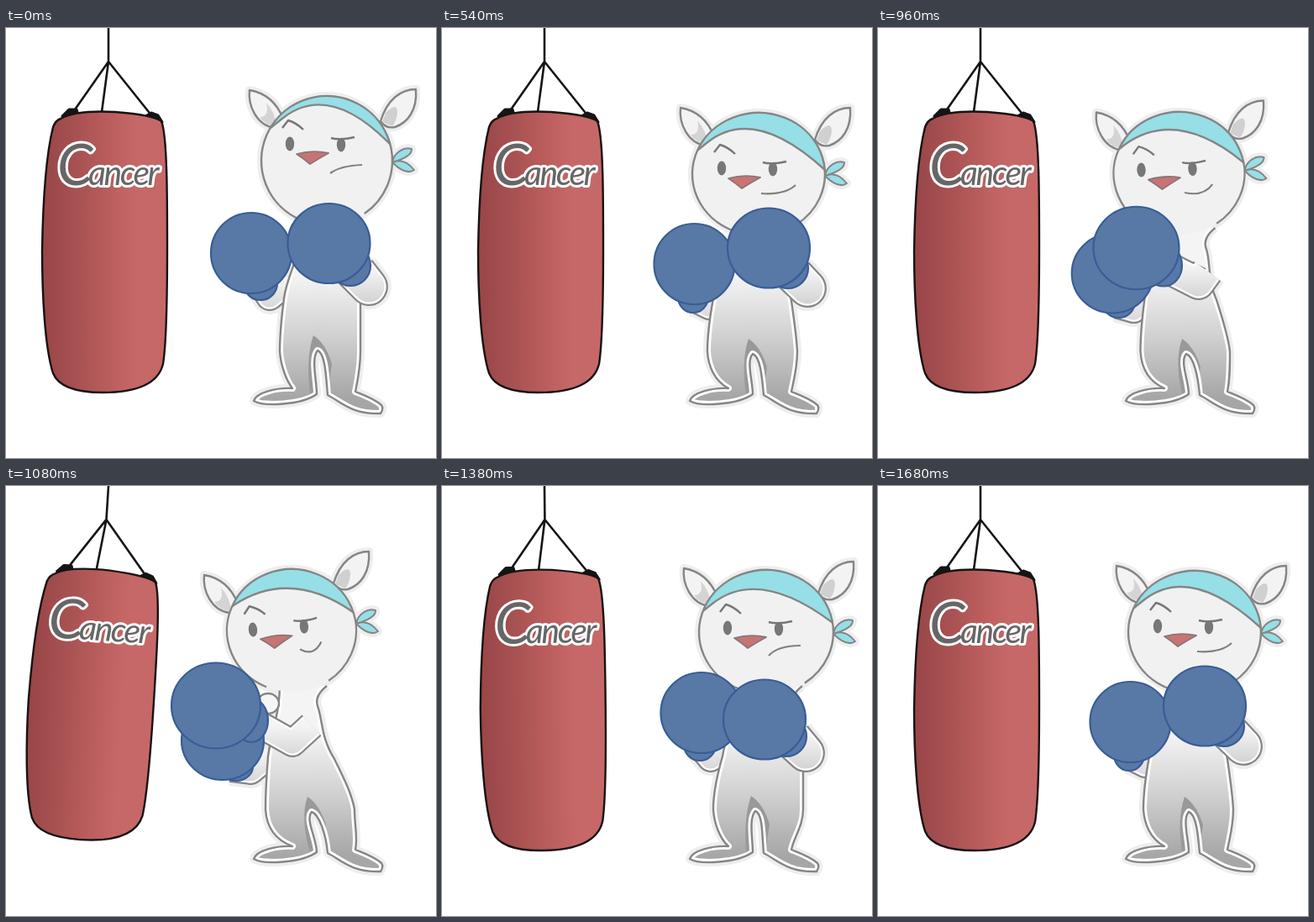
Write an HTML page with a canvas that moves like this. It is 512 px wide and 512 px high and loops after 1.74 s.

```html
<!DOCTYPE html>
<html lang="en">
<head>
<meta charset="utf-8">
<title>Punching bag</title>
<style>
html, body { margin: 0; width: 100%; height: 100%; overflow: hidden; background: #fff; }
canvas { display: block; width: 100vw; height: 100vh; }
</style>
</head>
<body>
<canvas id="stage" width="512" height="512"></canvas>
<script>
const ctx = document.getElementById('stage').getContext('2d');
const STEP = 60, FRAMES = 29;
const GRAY = '#858585', BLUE = '#5878a6', NAVY = '#395d96';

// head: cx cy rx ry; torso: neck, chest, hip (left), crotch x y, hip, chest, neck (right)
// arms: shoulder, elbow, wrist, thickness; mouth is relative to the left eye
const up = {
  head: [382, 158, 78, 77], eye: [338, 138], tilt: [0], mouth: [48, 35, 60, 26, 86, 25],
  band: [330, 107, 384, 65, 455, 136], earL: [290, 74], earR: [488, 73],
  torso: [352, 331, 326, 371, 384, 422, 422, 412],
  armL: [338, 300, 314, 320, 303, 303, 34], armR: [418, 290, 432, 308, 410, 286, 46],
  gloveL: [292, 268, 48, 48], cuffL: [303, 304, 20, 20],
  gloveR: [384.5, 256.5, 49, 47.5], cuffR: [410, 283, 24, 24], wrist: [0]
};
const sink = {
  head: [386, 174, 80, 74], eye: [340, 169], tilt: [0], mouth: [49, 33, 60, 21, 87, 21],
  band: [322, 140, 377, 97, 464, 162], earL: [288, 98], earR: [490, 90],
  torso: [356, 334, 323, 373, 387, 430, 430, 416],
  armL: [340, 308, 320, 324, 307, 308, 34], armR: [418, 300, 433, 318, 410, 297, 46],
  gloveL: [309, 270, 48.5, 48], cuffL: [307, 308, 19, 19],
  gloveR: [384, 278, 49, 47.5], cuffR: [410, 298, 24, 24], wrist: [0]
};
const low = {
  ...sink,
  head: [387, 180, 80, 73], eye: [341, 179], mouth: [50, 32, 62, 21, 87, 19],
  band: [322, 150, 378, 109, 464, 165], earL: [288, 108], earR: [491, 96],
  torso: [356, 335, 322, 375, 388, 433, 434, 416],
  armL: [340, 310, 322, 326, 308, 308, 34], armR: [418, 302, 433, 320, 410, 300, 46],
  gloveL: [313, 271, 48, 48], cuffL: [308, 309, 19, 19],
  gloveR: [383.5, 285, 49, 47.5], cuffR: [410, 302, 24, 23]
};
const lean = {
  head: [377, 174, 79, 73], eye: [333, 167], tilt: [0], mouth: [47, 30, 75, 32, 88, 20],
  band: [315, 137, 371, 91, 456, 169], earL: [284, 95], earR: [486, 95],
  torso: [350, 323, 316, 370, 388, 423, 416, 408],
  armL: [332, 318, 318, 333, 302, 325, 30], armR: [420, 294, 435, 310, 412, 288, 46],
  gloveL: [300.5, 281, 48, 48], cuffL: [299, 320, 18, 19],
  gloveR: [389, 262, 49, 47.5], cuffR: [412, 286, 24, 24], wrist: [0]
};
const guard = {
  head: [340, 172, 77, 73], eye: [294, 171], tilt: [-.08], mouth: [54, 28, 70, 38, 80, 21],
  band: [271, 142, 338, 98, 413, 150], earL: [236, 106], earR: [432, 78],
  torso: [326, 312, 309, 364, 388, 415, 391, 369],
  armL: [315, 318, 291, 338, 268, 335, 36], armR: [364, 285, 341, 306, 302, 284, 34],
  gloveL: [258, 303, 49, 47], cuffL: [274, 334, 20, 17],
  gloveR: [250, 261.5, 53, 51], cuffR: [292, 279, 20, 26], wrist: [13]
};
const hit = {
  ...guard, armR: [364, 285, 328, 298, 272, 280, 34],
  gloveR: [226, 262, 53, 51], cuffR: [268, 279, 20, 26], wrist: [0]
};

const poseKeys = [
  [0, up], [1, sink], [2, low], [4, lean], [5, up], [6, sink], [7, low], [9, lean],
  [10, up], [11, sink], [13, low], [15, lean], [17, hit], [18, guard],
  [22, up], [23, sink], [25, low], [28, lean], [29, up]
];
const swingKeys = [[0, 0], [16, 0], [17, 2], [18, 3.6], [22, 0], [23, -.6], [26, 0], [29, 0]];

const mix = (a, b, k) => a + (b - a) * k;
function sample(keys, frame, blend) {
  const i = keys.findIndex(key => key[0] > frame);
  const [t0, a] = keys[i - 1], [t1, b] = keys[i];
  return blend(a, b, (frame - t0) / (t1 - t0));
}
const mixPose = (a, b, k) => Object.fromEntries(
  Object.keys(a).map(name => [name, a[name].map((v, i) => mix(v, b[name][i], k))]));

function paint(path, fill, stroke, width = 2.4) {
  if (fill) { ctx.fillStyle = fill; ctx.fill(path); }
  if (stroke) { ctx.strokeStyle = stroke; ctx.lineWidth = width; ctx.stroke(path); }
}
function oval([x, y, rx, ry], from = 0, to = Math.PI * 2) {
  const path = new Path2D();
  path.ellipse(x, y, rx, ry, 0, from, to);
  return path;
}
function moved(d, x, y) {
  const path = new Path2D();
  path.addPath(new Path2D(d), new DOMMatrix([1, 0, 0, 1, x, y]));
  return path;
}
function gradient(x0, y0, x1, y1, ...colors) {
  const g = ctx.createLinearGradient(x0, y0, x1, y1);
  colors.forEach((c, i) => g.addColorStop(i / (colors.length - 1), c));
  return g;
}
function inside(path, draw) {
  ctx.save();
  ctx.clip(path);
  draw();
  ctx.restore();
}

function drawBag(angle) {
  const squash = 1 - Math.max(0, angle) * .01;
  ctx.save();
  ctx.translate(122, 0);
  ctx.rotate(angle * Math.PI / 180);
  ctx.translate(-122, 0);
  paint(new Path2D('M122 -8V40L80 100M122 40L114 100M122 40L174 105'), null, '#151515', 2.6);
  ctx.translate(0, 110 * (1 - squash));
  ctx.scale(1, squash);
  paint(new Path2D('M67 105L75 97 84 97 86 104ZM166 105L173 101 181 104 186 112Z'), '#151515', '#151515', 3);
  paint(new Path2D(`M65 108C80 99 110 99 130 100C155 102 178 105 185 111
    C192 128 192 200 192 260C192 330 191 375 187 400C181 425 152 434 115 434
    C82 434 62 426 56 411C46 380 43 315 43 265C44 205 48 150 56 118Q59 110 65 108Z`),
    gradient(44, 0, 192, 0, '#994648', '#a65051', '#b85c5b', '#c66867', '#c66867'), '#171314', 2.4);
  const letters = [['C', 'italic 68px Lato, sans-serif', 61, '0px'],
    ['ancer', 'italic 41px Lato, sans-serif', 98, '-2.5px']];
  const lettering = draw => letters.forEach(([text, font, x, spacing]) => {
    ctx.font = font;
    ctx.letterSpacing = spacing;
    draw(text, x, 187);
  });
  ctx.strokeStyle = '#fff';
  ctx.lineWidth = 6;
  lettering((...args) => ctx.strokeText(...args));
  ctx.fillStyle = '#666';
  lettering((...args) => ctx.fillText(...args));
  ctx.restore();
}

// Open at the neck, so that no line crosses the throat
function torsoPath([nl, cl, hl, x, y, hr, cr, nr]) {
  const flare = hr - cr;
  return new Path2D(`M${nl} 238C${nl} 270 ${cl + 4} 292 ${cl} 322
    C${mix(cl, hl, .6)} 345 ${hl} 365 ${hl} 385C${hl + 1} 402 ${hl + 8} 420 341 429
    C322 428 298 434 295 444C306 451 352 449 370 436
    C370 420 ${x - 8} ${y + 9} ${x} ${y}C${x + 9} ${y + 3} 381 415 383 437
    C400 446 412 460 446 459Q450 453 447 449C438 441 426 437 416 433
    C419 418 ${hr} 405 ${hr} 385C${hr - flare * .15} 365 ${cr + flare * .4} 345 ${cr} 325
    C${cr - flare * .5 - 4} 300 ${nr + 8} 278 ${nr + 2} 262Q${nr - 2} 250 ${nr + 13} 238`);
}
function limbPath([sx, sy, ex, ey, wx, wy]) {
  return new Path2D(`M${sx} ${sy}L${ex} ${ey} ${wx} ${wy}`);
}
function drawLimb(path, [, , , y, , , width]) {
  paint(path, null, GRAY, width);
  paint(path, null, '#fff', width - 4.5);
  paint(path, null, gradient(0, y - 20, 0, y + 22, '#f4f4f4', '#d0d0d0'), width - 9);
}

function drawTorso(path, [, , , x, y]) {
  paint(path, gradient(0, 295, 0, 440, '#f4f4f4', '#d0d0d0', '#a6a6a6'));
  inside(path, () => {
    paint(new Path2D(`M${x - 5} ${y - 18}Q${x + 10} ${y - 8} ${x + 17} ${y + 16}L${x + 12} 436H362
      Q${x - 14} ${y + 8} ${x - 5} ${y - 18}Z`), '#999');
    paint(path, null, '#fff', 8);
  });
  paint(path, null, GRAY);
}

function drawFace({ eye, tilt, mouth: m }) {
  ctx.save();
  ctx.translate(...eye);
  ctx.rotate(tilt[0]);
  paint(oval([0, 0, 5.2, 8.5]), '#777');
  inside(new Path2D('M40 -7H90V30H40Z'), () => paint(oval([61, 1, 5.2, 8.5]), '#777'));
  paint(new Path2D('M49 -7Q60 -4 77 -8M-9 -19L-2 -28Q8 -25 16 -17'), null, '#777');
  paint(new Path2D('M8 12Q27 7 46 11Q35 17 24 24Q17 18 8 12Z'), '#c97373', '#88777a', 1.8);
  paint(new Path2D(`M${m[0]} ${m[1]}Q${m.slice(2)}`), null, '#808080', 2.2);
  ctx.restore();
}

function drawHead(p, head) {
  const [x0, y0, cx, cy, x1, y1] = p.band;
  paint(head, '#f1f1f1');
  inside(head, () => {
    paint(new Path2D(`M${x0 - 30} ${y0 + 24}L${x0} ${y0}Q${cx} ${cy} ${x1} ${y1}l30 32V40H${x0 - 30}Z`),
      '#96dfe7', GRAY);
  });
  paint(oval(p.head, 1.97, .96 + Math.PI * 2), null, GRAY);
  drawFace(p);
}

function drawBear(p) {
  const head = oval(p.head), torso = torsoPath(p.torso);
  const armL = limbPath(p.armL), armR = limbPath(p.armR);
  const earL = moved('M40 34C32 14 18 3 0 0C-2 18 8 42 30 45Z', ...p.earL);
  const earR = moved('M0 0C-18 0 -34 12 -42 38Q-36 47 -25 45C-10 40 2 25 0 0Z', ...p.earR);
  const bow = moved('M0 0C2 -12 14 -19 23 -16Q24 -7 0 0ZM0 0Q14 -6 26 9Q16 16 0 0Z',
    p.head[0] + p.head[2], p.head[1] + 2 + p.tilt[0] * 125);
  const mitts = [p.cuffL, p.gloveL, p.cuffR, p.gloveR].map(m => oval(m));

  [head, torso, earL, earR, bow].forEach(path => paint(path, null, '#eee', 10));
  paint(armL, null, '#eee', p.armL[6] + 8);
  paint(armR, null, '#eee', p.armR[6] + 8);

  drawLimb(armL, p.armL);
  drawTorso(torso, p.torso);
  paint(earL, '#f3f3f3', GRAY);
  paint(moved('M20 15Q31 27 32 43Q18 42 12 32Q24 32 20 15Z', ...p.earL), '#d4d4d4');
  paint(earR, '#f3f3f3', GRAY);
  paint(moved('M-36 28Q-22 14 -22 28Q-23 38 -28 44L-40 39Z', ...p.earR), '#d0d0d0');
  paint(bow, '#96dfe7', GRAY, 2);
  drawHead(p, head);
  if (p.wrist[0] > 6) {
    paint(oval([p.cuffR[0] + 20, p.cuffR[1] - 20, p.wrist[0], 12]), '#f6f6f6', GRAY);
  }
  drawLimb(armR, p.armR);
  mitts.forEach(path => paint(path, BLUE, NAVY, 2.2));
}

function draw(now) {
  const frame = Math.floor(now / STEP) % FRAMES;
  ctx.clearRect(0, 0, 512, 512);
  ctx.lineJoin = 'round';
  drawBag(sample(swingKeys, frame, mix));
  drawBear(sample(poseKeys, frame, mixPose));
}

let start;
function tick(now) {
  start ??= now;
  draw(now - start);
  requestAnimationFrame(tick);
}
draw(0);
requestAnimationFrame(tick);
</script>
</body>
</html>
```
